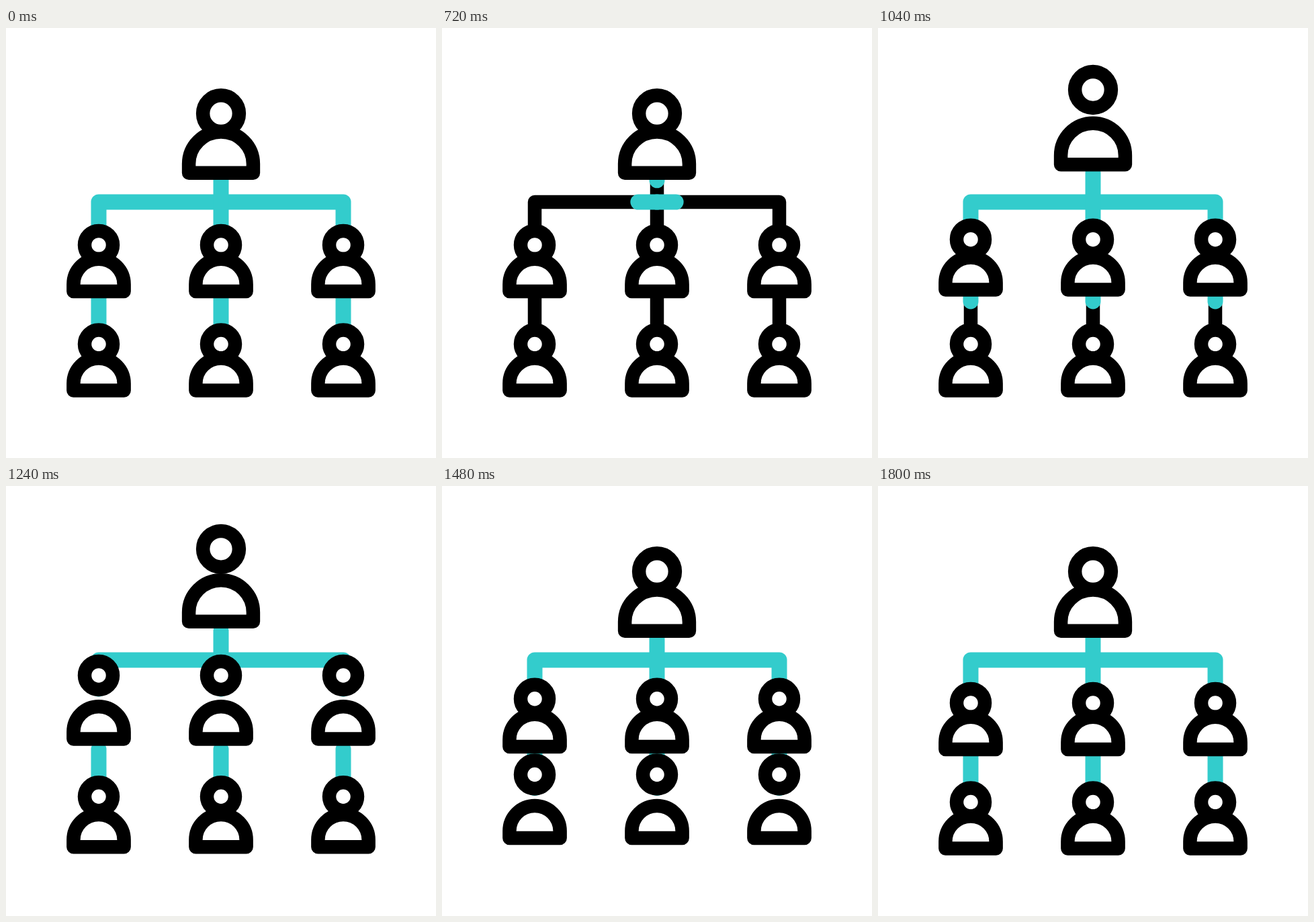
An HTML page with a canvas that plays this animation: 640x640 px, repeating every 2000 ms.

```html
<!DOCTYPE html>
<html lang="en">
<head>
<meta charset="utf-8">
<title>Organisation chart</title>
<style>
  html, body { margin: 0; width: 100%; height: 100%; overflow: hidden; background: #fff; }
  canvas { display: block; width: 640px; height: 640px; }
</style>
</head>
<body>
<canvas id="stage" width="640" height="640"></canvas>
<script>
const ctx = document.getElementById('stage').getContext('2d');
const LOOP = 2000, STEP = 40;
const BLACK = '#000', TEAL = '#33cccc', STROKE = 20.5, TEAL_STROKE = 23;
const COLUMNS = [138, 320, 502];

const BIG = { headY: 127.2, headR: 26.9, arcY: 202.3, arcR: 47.9, baseY: 215.8 };
const SMALL = { headY: 322.9, headR: 21, arcY: 381.4, arcR: 37.6, baseY: 392 };
const ROW_GAP = 147.6;

const UPPER_LINES = [
  [[320, 259], [138, 259], [138, 302]],
  [[320, 259], [502, 259], [502, 302]],
  [[320, 216], [320, 302]]
];
const LOWER_LINES = COLUMNS.map(x => [[x, 392], [x, 449.5]]);

const ramp = (t, from, to) => Math.min(1, Math.max(0, (t - from) / (to - from)));
const ease = u => u * u * (3 - 2 * u);

// Rises, holds and falls back; s is the time since the jump began.
const hop = (s, rise, fall) =>
  ease(ramp(s, rise, rise + 253)) - ease(ramp(s, fall, fall + 250));

function lineLength(points) {
  return points.slice(1).reduce((sum, [x, y], i) =>
    sum + Math.hypot(x - points[i][0], y - points[i][1]), 0);
}

// Strokes the part of a polyline between two fractions of its length.
function strokePart(points, color, width, from, to) {
  if (to <= from) return;
  const length = lineLength(points);
  ctx.beginPath();
  points.forEach(([x, y]) => ctx.lineTo(x, y));
  ctx.setLineDash(from > 0 || to < 1 ? [(to - from) * length, 2000] : []);
  ctx.lineDashOffset = -from * length;
  ctx.strokeStyle = color;
  ctx.lineWidth = width;
  ctx.stroke();
  ctx.setLineDash([]);
}

function drawLines(lines, t, [eraseFrom, eraseTo], [drawFrom, drawTo]) {
  const erased = ramp(t, eraseFrom, eraseTo);
  const drawn = ramp(t, drawFrom, drawTo);
  const [from, to] = t < 640 ? [erased, 1] : [0, drawn];
  lines.forEach(line => strokePart(line, BLACK, STROKE, 0, 1));
  lines.forEach(line => strokePart(line, TEAL, TEAL_STROKE, from, to));
}

function drawPerson(shape, x, dy, s) {
  const headUp = 41 * hop(s, 0, 324);
  const bodyUp = 15.5 * hop(s, 10, 346);
  ctx.fillStyle = '#fff';
  ctx.strokeStyle = BLACK;
  ctx.lineWidth = STROKE;

  ctx.beginPath();
  ctx.arc(x, shape.headY + dy - headUp, shape.headR, 0, Math.PI * 2);
  ctx.fill();
  ctx.stroke();

  const y = dy - bodyUp;
  ctx.beginPath();
  ctx.moveTo(x - shape.arcR, shape.baseY + y);
  ctx.arc(x, shape.arcY + y, shape.arcR, Math.PI, 0);
  ctx.lineTo(x + shape.arcR, shape.baseY + y);
  ctx.closePath();
  ctx.fill();
  ctx.stroke();
}

function draw(t) {
  ctx.fillStyle = '#fff';
  ctx.fillRect(0, 0, 640, 640);
  ctx.lineCap = ctx.lineJoin = 'round';

  drawLines(UPPER_LINES, t, [80, 540], [680, 1000]);
  drawLines(LOWER_LINES, t, [298, 560], [957, 1277]);

  drawPerson(BIG, 320, 0, t - 847);
  COLUMNS.forEach(x => {
    drawPerson(SMALL, x, 0, t - 967);
    drawPerson(SMALL, x, ROW_GAP, t - 1167);
  });
}

const start = performance.now();
function tick() {
  const t = (performance.now() - start) % LOOP;
  draw(Math.floor(t / STEP) * STEP);
  requestAnimationFrame(tick);
}
tick();
</script>
</body>
</html>
```
